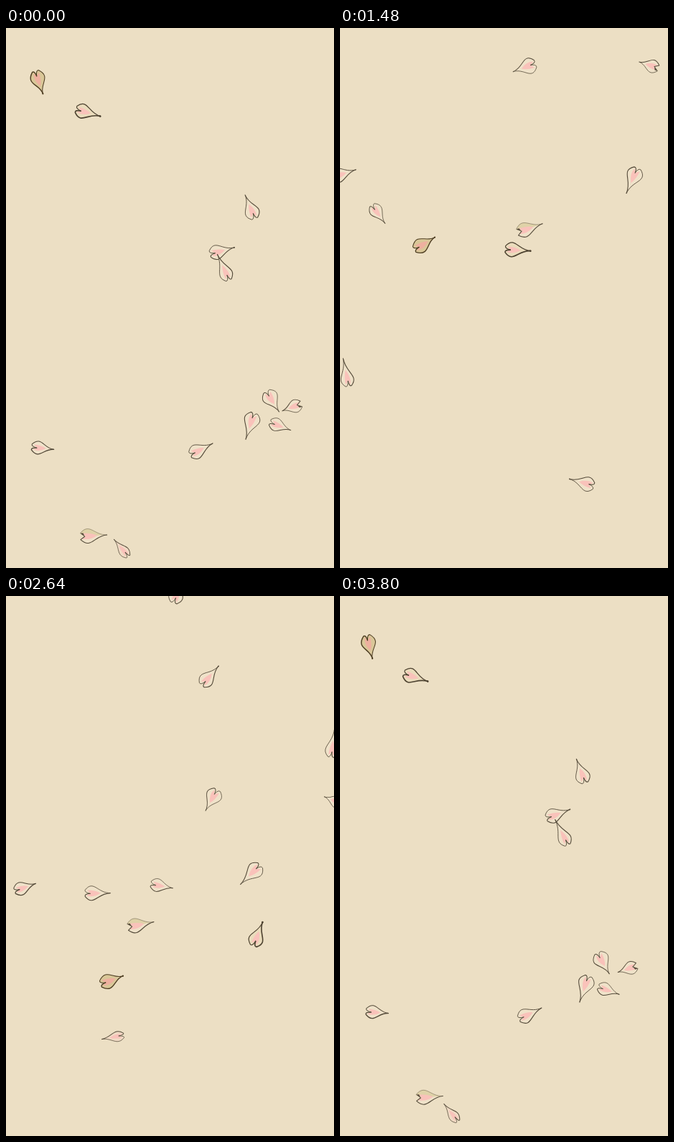
These frames come from a looping animation (457 px wide and 750 px high, 3840 ms). An HTML page with a canvas:

```html
<!DOCTYPE html>
<html lang="en">
<head>
<meta charset="utf-8">
<title>Falling petals</title>
<style>
  html, body { margin: 0; width: 100%; height: 100%; overflow: hidden; background: #ecdfc4; }
  canvas { display: block; }
</style>
</head>
<body>
<canvas id="stage" width="457" height="750"></canvas>
<script>
const LOOP = 3840, STEP = 40, MARGIN = 0.08;
const ctx = document.getElementById('stage').getContext('2d');
const petals = [];

// Sizes: stem tip and lobes measured from the middle, and half the width.
const plain = { tip: 21, back: 14, half: 10, ink: '#544a39', line: 1.1, fill: '#efe2c9', pink: '#f9c2ba' };
const olive = { ...plain, tip: 17, back: 16, ink: '#4d3d22', line: 1.4, fill: '#d9c798', pink: '#eeb09f', dot: 1.1 };
const bold = { ...plain, ink: '#4d4230', line: 1.6, fill: '#eadcbc', dot: 1.4 };
const dotted = { ...plain, dot: 0.9 };
const shaded = { ...plain, back: 16, shade: '#dfd2a8', jag: true };
const pale = { ...plain, tip: 19, line: 0.95 };
const small = { ...pale, tip: 17, half: 9 };
const jagged = { ...small, tip: 14, jag: true };
const slim = { ...small, half: 7, fill: '#f0dac4' };
const longStem = { ...plain, tip: 25, half: 9 };

const still = [0, 0, 0];

// A flight is a straight glide, bent by one bow and one full sway.
// Each pose is [x, y, direction of the stem in degrees].
function fly(look, start, end, { from, to, bow = still, sway = still }) {
  const pose = u => from.map((v, k) =>
    v + (to[k] - v) * u + bow[k] * 4 * u * (1 - u) + sway[k] * Math.sin(2 * Math.PI * u));
  petals.push({ look, start, span: end - start, pose, ...petalPaths(look) });
}

// Adds one side of the heart, from the stem round to the notch.
function makeSide({ tip, back, half, jag }, side) {
  const path = new Path2D();
  path.moveTo(tip, 0);
  path.bezierCurveTo(tip * 0.15, 0, -2, side * half * 1.9, -back, side * half * 0.45);
  if (jag) path.lineTo(6 - back, 0.5);
  else path.quadraticCurveTo(-back - 1, side, 7 - back, 0.5);
  return path;
}

function makeStreak({ tip, back, half }) {
  const path = new Path2D(), w = half * 0.42;
  path.moveTo(tip * 0.35, 0);
  path.quadraticCurveTo(0, -w, 3 - back, -w);
  path.lineTo(7 - back, 0.5);
  path.lineTo(2 - back, w * 0.8);
  path.quadraticCurveTo(-3, w * 1.6, tip * 0.35, 0);
  return path;
}

function petalPaths(look) {
  return { upper: makeSide(look, -1), lower: makeSide(look, 1), streak: makeStreak(look) };
}

fly(olive, -600, 3500, { from: [-40, 8, 150], to: [235, 740, 40], bow: [20, -80, -125], sway: [45, 0, 0] });
fly(bold, -600, 3300, { from: [-40, 45, 60], to: [500, 572, -195], bow: [12, -18, 70], sway: [75, 0, -50] });
fly(shaded, 300, 4150, { from: [490, 160, -60], to: [100, 780, 0], bow: [-92, -84, 18], sway: [-32, 0, 8] });
fly({ ...plain, tip: 24, half: 11 }, 960, 4800,
  { from: [470, 105, 80], to: [330, 752, 88], bow: [-58, -16, 48], sway: [-20, 30, 14] });
fly({ ...pale, half: 11 }, 1100, 4600,
  { from: [255, -25, 170], to: [480, 690, 10], bow: [-72, -12, 20], sway: [12, 10, 0] });
fly(jagged, 1110, 4880, { from: [400, -25, 185], to: [338, 775, 122], bow: [75, -22, 38], sway: [17, 10, 10] });
fly(small, 1100, 4300, { from: [-25, 210, 80], to: [480, 610, 40], bow: [-6, 0, -50], sway: [30, 0, 0] });
fly(plain, 1300, 4780, { from: [-18, 167, -25], to: [500, 692, -42], bow: [-80, 46, 26], sway: [28, 0, 10] });
fly({ ...small, line: 1.3 }, 2200, 5150,
  { from: [-25, 325, -10], to: [140, 770, 10], bow: [-5, 14, 0], sway: [35, 8, -15] });
fly(slim, 1800, 4150, { from: [-30, 565, 160], to: [215, 760, 215], bow: [50, -24, 10], sway: [60, 0, -24] });
fly(plain, 2520, 4780, { from: [232, -40, -70], to: [474, 316, -186], bow: [-33, 86, 26] });
fly(dotted, 1960, 5800, { from: [150, -5, 60], to: [440, 775, 260], bow: [0, -68, -170], sway: [90, 22, -50] });
fly(longStem, 2460, 5440, { from: [470, 190, -60], to: [-20, 495, -110], bow: [62, 6, -22], sway: [0, 0, -40] });

function drawPetal({ look, upper, lower, streak }, [x, y, angle]) {
  const fill = (color, path) => { ctx.fillStyle = color; ctx.fill(path); };
  const stroke = (width, path) => { ctx.lineWidth = width; ctx.stroke(path); };
  ctx.save();
  ctx.translate(x, y);
  ctx.rotate(angle * Math.PI / 180);
  fill(look.shade || look.fill, upper);
  fill(look.fill, lower);
  fill(look.pink, streak);
  ctx.strokeStyle = look.ink;
  stroke(look.line * (look.shade ? 0.4 : 0.75), upper);
  stroke(look.line, lower);
  if (look.dot) {
    const dot = new Path2D();
    dot.arc(look.tip, 0, look.dot, 0, Math.PI * 2);
    fill(look.ink, dot);
  }
  if (look.jag) {
    const barb = new Path2D();
    barb.moveTo(-look.back, -look.half * 0.45);
    barb.lineTo(6 - look.back, 0.5);
    barb.lineTo(4 - look.back, -look.half * 0.45);
    fill(look.ink, barb);
  }
  ctx.restore();
}

// Flights may begin in the previous loop or end in the next one.
function render(time) {
  ctx.fillStyle = '#ecdfc4';
  ctx.fillRect(0, 0, 457, 750);
  for (const petal of petals) {
    for (const shift of [-LOOP, 0, LOOP]) {
      const u = (time + shift - petal.start) / petal.span;
      if (u >= -MARGIN && u <= 1 + MARGIN) drawPetal(petal, petal.pose(u));
    }
  }
}

ctx.lineCap = ctx.lineJoin = 'round';
let began = null;
function tick(now) {
  began ??= now;
  render(Math.floor(((now - began) % LOOP) / STEP) * STEP);
  requestAnimationFrame(tick);
}
render(0);
requestAnimationFrame(tick);
</script>
</body>
</html>
```
